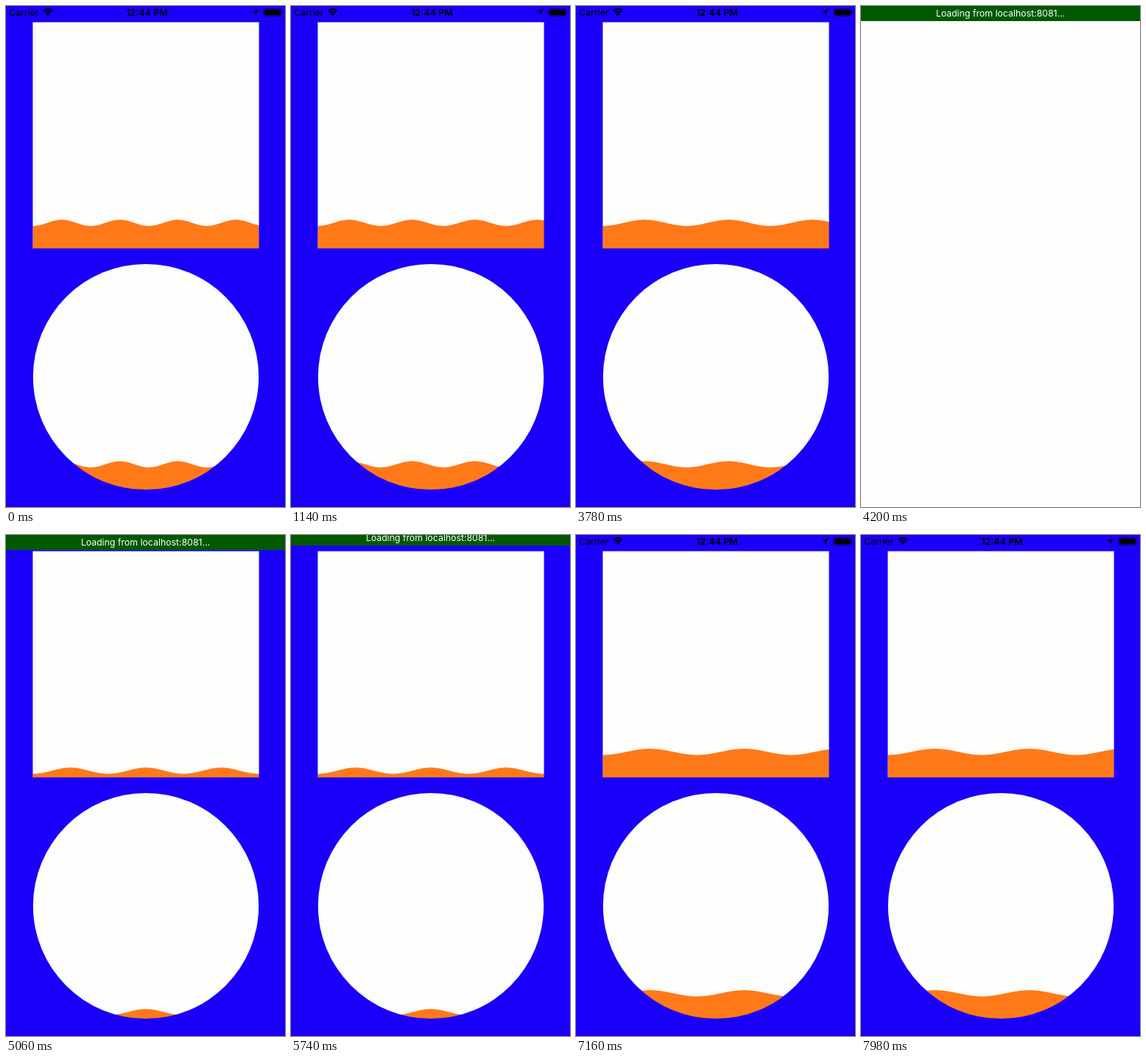
An HTML page for the animation above (8000 ms loop, 370 px wide and 664 px high).

```html
<!DOCTYPE html>
<html lang="en">
<head>
<meta charset="utf-8">
<style>
  html, body { margin: 0; width: 100%; height: 100%; overflow: hidden; }
  svg { display: block; width: 370px; height: 664px; background: #fdfdfb; }
  text { font: 12px Inter, sans-serif; }
  .clock { font-size: 12.2px; font-weight: 600; }
</style>
</head>
<body>
<svg viewBox="0 0 370 664">
  <defs>
    <pattern id="tank" width="370" height="400" patternUnits="userSpaceOnUse">
      <rect width="370" height="400" fill="#fdfdfb"/>
      <path id="wave" fill="#ff7919"/>
    </pattern>
  </defs>

  <g id="app">
    <rect width="370" height="664" fill="#1a00f8"/>
    <rect x="35.5" y="21.5" width="300" height="299.8" fill="url(#tank)"/>
    <circle cx="185.5" cy="171.5" r="149.6" fill="url(#tank)" transform="translate(0 320)"/>
    <text x="4" y="12.6">Carrier</text>
    <g fill="none" stroke="#000" stroke-width="2.2">
      <path d="M49.5 6.6a8.6 8.6 0 0 1 12 0M51.8 9.1a5.4 5.4 0 0 1 7.4 0"/>
      <path d="M55.5 13l-2.1-2.2a3 3 0 0 1 4.2 0z" fill="#000" stroke="none"/>
    </g>
    <text class="clock" x="187" y="12.6" text-anchor="middle">12:44 PM</text>
    <path d="M334.5 4l-3.7 8.2-.6-3.9-3.9-.6z"/>
    <rect x="341.9" y="3.9" width="22.9" height="9.2" rx="2" fill="none" stroke="#000" stroke-width=".8"/>
    <rect x="343" y="5" width="20.7" height="7" rx="1"/>
    <path d="M365.8 6.8q1.8 1.7 0 3.4z"/>
  </g>

  <g id="banner">
    <rect width="370" height="20" fill="#005900"/>
    <text x="185" y="13.7" text-anchor="middle" fill="#fff">Loading from localhost:8081...</text>
  </g>
</svg>
<script>
  const LOOP = 8000, UNLOAD = 3900, MOUNT = 5060, HIDE = 5650, HIDE_TIME = 250;
  const LEFT = 35.5, RIGHT = 336.5, BOTTOM = 321.5, SWELL = 8.2;
  const app = document.getElementById('app');
  const banner = document.getElementById('banner');
  const wave = document.getElementById('wave');

  // count: wave periods per 1000 px, level: height of the troughs above the bottom
  const waveAt = t => {
    if (t < MOUNT) return { count: 13 - Math.floor((t + 280) / 1000), level: 30 };
    const tick = Math.floor((t - MOUNT) / 1000);
    return { count: 10 - tick, level: 5 * (tick + 1) * (tick + 2) / 2 };
  };

  const wavePath = ({ count, level }) => {
    let d = `M${LEFT} 400`;
    for (let x = LEFT; x <= RIGHT; x++) {
      const phase = (x - LEFT) * count / 1000 * 2 * Math.PI;
      const y = BOTTOM - level - SWELL / 2 * (1 - Math.cos(phase));
      d += `L${x} ${y.toFixed(2)}`;
    }
    return d + 'V400Z';
  };

  const show = (el, on) => el.setAttribute('visibility', on ? 'visible' : 'hidden');

  function draw(now) {
    const t = now % LOOP;
    wave.setAttribute('d', wavePath(waveAt(t)));
    show(app, t < UNLOAD || t >= MOUNT);
    show(banner, t >= UNLOAD && t < HIDE + HIDE_TIME);
    const p = Math.min(1, Math.max(0, (t - HIDE) / HIDE_TIME));
    banner.setAttribute('transform', `translate(0 ${-20 * p * p * (3 - 2 * p)})`);
    requestAnimationFrame(() => draw(performance.now()));
  }
  draw(performance.now());
</script>
</body>
</html>
```
